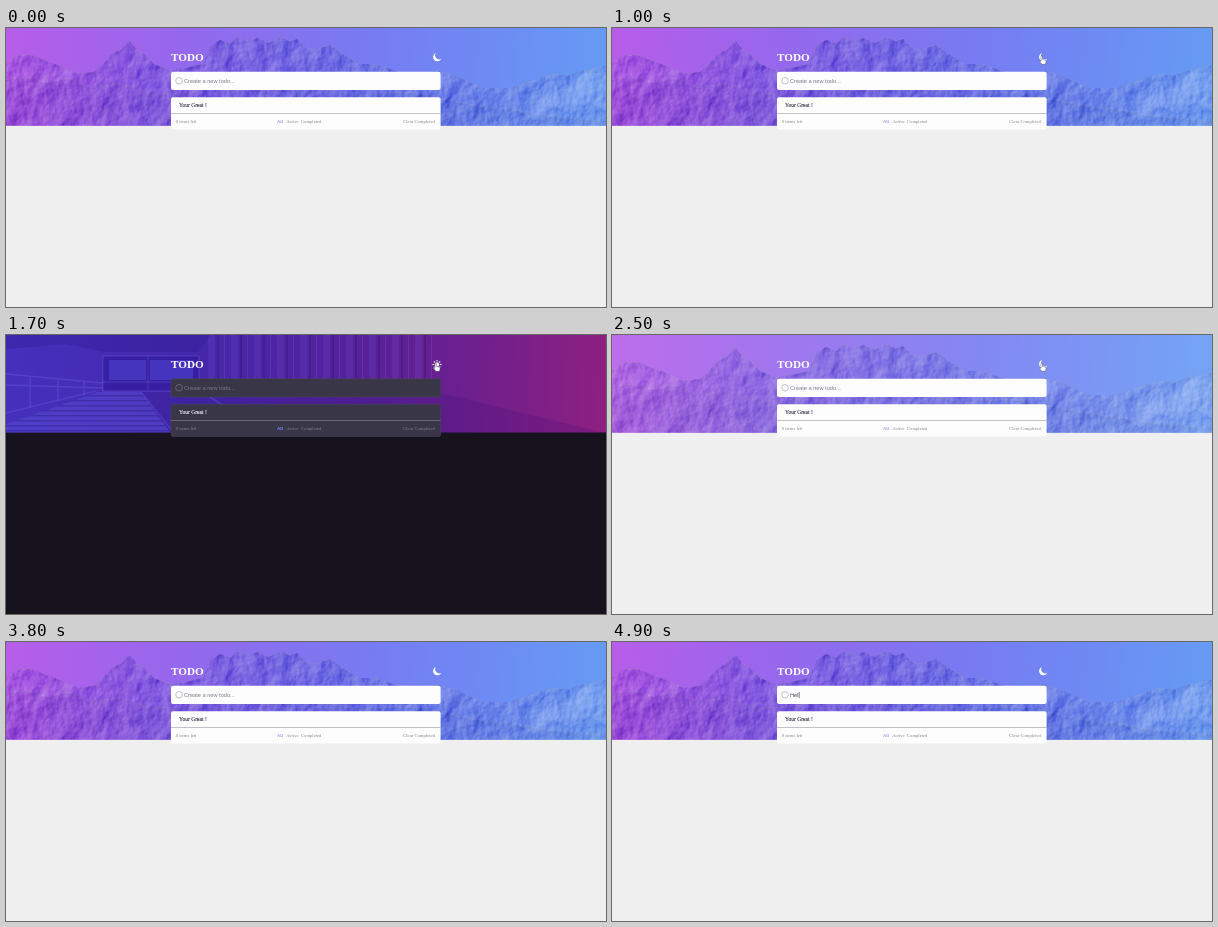
These frames come from a looping animation (600x279 px, 5100 ms). An HTML page:

```html
<!DOCTYPE html>
<html lang="en">
<head>
<meta charset="utf-8">
<title>Todo list</title>
<style>
html, body { margin: 0; height: 100%; overflow: hidden; background: #efeff0; }
svg { display: block; width: 100vw; height: 100vh; }

.light { --card: #fdfdfe; --ink: #34344a; --muted: #85858f; --line: #b4b4b9; --all: #b0a4ea; --ring: #a9a9b5; --edge: none; }
.dark { --card: #393747; --ink: #f4f2fa; --muted: #858191; --line: #77747f; --all: #7387f0; --ring: #777483; --edge: #4a4658; }

text { font-family: "Liberation Serif", "Times New Roman", serif; }
.title { font-size: 11.2px; font-weight: bold; fill: #fff; }
.task { font-size: 5.55px; fill: var(--ink); stroke: var(--ink); stroke-width: .12; }
.small { font-size: 4.65px; fill: var(--muted); }
.all { fill: var(--all); stroke: var(--all); stroke-width: .2; }
.field { font-family: "Liberation Sans", Arial, sans-serif; font-size: 5.65px; }
.typed { fill: #45454f; }
.card { fill: var(--card); stroke: var(--edge); stroke-width: .5; }
.ring { fill: none; stroke: var(--ring); stroke-width: .7; }
.rule { stroke: var(--line); stroke-width: .8; }

.dark, .veil, .shade, .hint, .typed tspan, .caret, .hand, .arrow {
  animation: 5.1s step-end infinite;
}
.dark { animation-name: theme; }
.veil { animation-name: veil; fill: #fff; }
.shade { animation-name: shade; fill: #17102a; }
.hint { animation-name: hint; fill: #7a7a84; }
.typed .h { animation-name: key1; }
.typed .e { animation-name: key2; }
.typed .l { animation-name: key3; }
.caret { animation-name: caret; fill: #33333d; }
.hand { animation-name: hand; }
.arrow { animation-name: arrow; }

@keyframes theme { 0%, 100% { visibility: hidden } 27.44% { visibility: visible } 49% { visibility: hidden } }
@keyframes veil {
  0%, 100% { opacity: 0 }
  49% { opacity: .1; animation-timing-function: steps(5) }
  58.8% { opacity: 0 }
}
@keyframes shade {
  0%, 100% { opacity: 0 }
  27.44% { opacity: .14; animation-timing-function: steps(3) }
  33.32% { opacity: 0 }
}
@keyframes hint { 0%, 100% { opacity: 1 } 88.2% { opacity: 0 } }
@keyframes key1 { 0%, 100% { fill-opacity: 0 } 88.2% { fill-opacity: 1 } }
@keyframes key2 { 0%, 100% { fill-opacity: 0 } 94.1% { fill-opacity: 1 } }
@keyframes key3 { 0%, 100% { fill-opacity: 0 } 96.06% { fill-opacity: 1 } }
@keyframes caret {
  0%, 100% { opacity: 0; transform: none }
  64.7% { opacity: 1; transform: none }
  74.5% { opacity: 0; transform: none }
  82.3% { opacity: 1; transform: none }
  88.2% { opacity: 1; transform: translateX(4.1px) }
  94.1% { opacity: 1; transform: translateX(7.2px) }
  96.06% { opacity: 1; transform: translateX(8.7px) }
}
@keyframes hand { 0%, 100% { visibility: hidden } 19.58% { visibility: visible } 54.9% { visibility: hidden } }
@keyframes arrow {
  0%, 100% { opacity: 0; transform: translate(446px, 52px) }
  13.7% { opacity: 1; transform: translate(446px, 52px); animation-timing-function: steps(3) }
  19.58% { opacity: 0; transform: translate(430px, 28px) }
  54.9% { opacity: 1; transform: translate(418px, 34px); animation-timing-function: steps(3) }
  60.78% { opacity: 0; transform: translate(300px, 52px) }
}
</style>
</head>
<body>
<svg viewBox="0 0 600 279" preserveAspectRatio="none">
  <defs>
    <clipPath id="banner"><path d="M0 0H600V97.5H0Z"/></clipPath>
    <linearGradient id="sky" gradientUnits="userSpaceOnUse" x2="600" y2="40">
      <stop stop-color="#b75de9"/><stop offset=".3" stop-color="#9468ed"/>
      <stop offset=".62" stop-color="#767cf2"/><stop offset="1" stop-color="#659bf4"/>
    </linearGradient>
    <linearGradient id="far" gradientUnits="userSpaceOnUse" x2="600" y2="0">
      <stop stop-color="#a854e0"/><stop offset=".25" stop-color="#8259df"/>
      <stop offset=".6" stop-color="#6a6fe4"/><stop offset="1" stop-color="#6996ec"/>
    </linearGradient>
    <linearGradient id="near" gradientUnits="userSpaceOnUse" x2="600" y2="0">
      <stop stop-color="#9d4dd8"/><stop offset=".3" stop-color="#795adb"/>
      <stop offset=".65" stop-color="#626ee0"/><stop offset="1" stop-color="#648fe6"/>
    </linearGradient>
    <linearGradient id="night" gradientUnits="userSpaceOnUse" x2="600" y2="30">
      <stop stop-color="#4530bd"/><stop offset=".3" stop-color="#4428ac"/>
      <stop offset=".6" stop-color="#56219a"/><stop offset=".8" stop-color="#711f8b"/>
      <stop offset="1" stop-color="#8e2081"/>
    </linearGradient>
    <filter id="rock" x="0" y="0" width="1" height="1" color-interpolation-filters="sRGB">
      <feTurbulence type="fractalNoise" baseFrequency=".05 .04" numOctaves="4" seed="8"/>
      <feDiffuseLighting surfaceScale="2.4" lighting-color="#fff" result="relief">
        <feDistantLight azimuth="215" elevation="31"/>
      </feDiffuseLighting>
      <feBlend in="relief" in2="SourceGraphic" mode="soft-light"/>
      <feComposite in2="SourceGraphic" operator="in"/>
    </filter>
    <pattern id="columns" width="23" height="60" patternUnits="userSpaceOnUse" patternTransform="translate(202 0)">
      <path d="M0 0H7V60H0Z" fill="#9a7cff" opacity=".1"/>
      <path d="M9 0H11V60H9Z" fill="#150848" opacity=".2"/>
      <path d="M16 0H17V60H16Z" fill="#c0a0ff" opacity=".12"/>
    </pattern>
    <pattern id="boards" width="60" height="5" patternUnits="userSpaceOnUse">
      <path d="M0 0H60V1.6H0Z" fill="#1b0d6d" opacity=".3"/>
    </pattern>

    <g id="panel">
      <text class="title" x="165" y="33.4">TODO</text>
      <rect class="card" x="165" y="43.8" width="269.6" height="18.2" rx="2"/>
      <circle class="ring" cx="173" cy="52.8" r="3.3"/>
      <rect class="card" x="165" y="69.3" width="269.6" height="32.2" rx="2"/>
      <path class="rule" d="M165 85.5H434.6"/>
      <text class="task" x="173" y="79.3">Your Great !</text>
      <g class="small">
        <text x="169.7" y="95.4">0 items left</text>
        <text class="all" x="271" y="95.4">All</text>
        <text x="280.2" y="95.4">Active</text>
        <text x="295" y="95.4">Completed</text>
        <text x="397.2" y="95.4">Clear Completed</text>
      </g>
    </g>
  </defs>

  <g class="light">
    <path d="M0 0H600V279H0Z" fill="#efeff0"/>
    <g clip-path="url(#banner)">
      <path d="M0 0H600V98H0Z" fill="url(#sky)"/>
      <path filter="url(#rock)" fill="url(#far)" d="M0 36L10 28 26 27 40 33 54 38 72 46 88 44 98 35 106 26 116 21 123 12 130 21 138 26 148 36 162 42 180 40 197 36 205 18 214 12 224 16 232 9 242 13 252 10 263 15 275 9 284 14 291 11 299 20 310 22 324 17 338 27 352 36 368 36 390 43 412 46 434 43 452 49 476 60 504 60 526 53 546 46 562 48 578 42 600 38V98H0Z"/>
      <path filter="url(#rock)" fill="url(#near)" d="M0 52L20 49 42 55 62 50 84 60 112 56 142 65 176 66 220 56 264 64 310 58 350 68 398 64 440 72 476 79 514 84 550 90 600 94V98H0Z"/>
      <path fill="#c4d8ff" opacity=".14" d="M510 82L530 64 546 50 552 62 578 46 600 44V82L582 74 566 86 548 78 528 92Z"/>
    </g>
    <path class="veil" d="M0 0H600V279H0Z"/>
    <use href="#panel"/>
    <path fill="#fff" d="M430 24.9A4.3 4.3 0 1 0 435.3 30.7A4 4 0 0 1 430 24.9Z"/>
  </g>

  <g class="dark">
    <path d="M0 0H600V279H0Z" fill="#16131f"/>
    <g clip-path="url(#banner)">
      <path d="M0 0H600V98H0Z" fill="url(#night)"/>
      <path d="M202 0H430V60H202Z" fill="url(#columns)"/>
      <path d="M0 0H205L192 17H98L60 9 0 14Z" fill="#241080" opacity=".25"/>
      <path d="M97 21H193V56H97Z" fill="#30189a" opacity=".6"/>
      <path d="M103 25H140V45H103ZM144 25H187V45H144Z" fill="#5148d5" opacity=".55"/>
      <path d="M97 21H193V56H97ZM142 21V56M97 47H193" fill="none" stroke="#7068e4" stroke-width="1" opacity=".4"/>
      <path d="M0 39L97 48M0 50L97 53M24 41V72M52 44V66M78 46V61" fill="none" stroke="#7f78ef" stroke-width="1.4" opacity=".25"/>
      <path d="M0 89L92 57H135L165 98H0Z" fill="#5b50d8" opacity=".45"/>
      <path d="M0 89L92 57H135L165 98H0Z" fill="url(#boards)"/>
      <path d="M135 57H430L600 98H165Z" fill="#260c6d" opacity=".15"/>
      <path d="M0 78L90 56M135 57L168 98M193 55L260 98" fill="none" stroke="#7d70ea" stroke-width="1.5" opacity=".25"/>
      <path class="shade" d="M0 0H600V98H0Z"/>
    </g>
    <use href="#panel"/>
    <circle cx="431" cy="29.5" r="2.3" fill="#fff"/>
    <circle cx="431" cy="29.5" r="3.8" fill="none" stroke="#fff" stroke-width="1.3" pathLength="80" stroke-dasharray="4 6" stroke-dashoffset="2"/>
  </g>

  <text class="field hint" x="178" y="55">Create a new todo...</text>
  <text class="field typed" x="178" y="55"><tspan class="h">H</tspan><tspan class="e">e</tspan><tspan class="l">l</tspan></text>
  <rect class="caret" x="178.1" y="50" width=".6" height="6"/>

  <g fill="#fff" stroke="#44405a" stroke-width=".45" stroke-linejoin="round">
    <path class="hand" d="M429 28.2q.8-.7 1.4.2v3l2.7.6q1.3.4 1 1.7l-.6 2.6h-3.6l-2.7-3q.3-1 1.8.1Z"/>
    <path class="arrow" d="M0 0V7.2L1.7 5.7 2.9 8.2 4 7.7 2.9 5.2H5.1Z"/>
  </g>
</svg>
</body>
</html>
```
